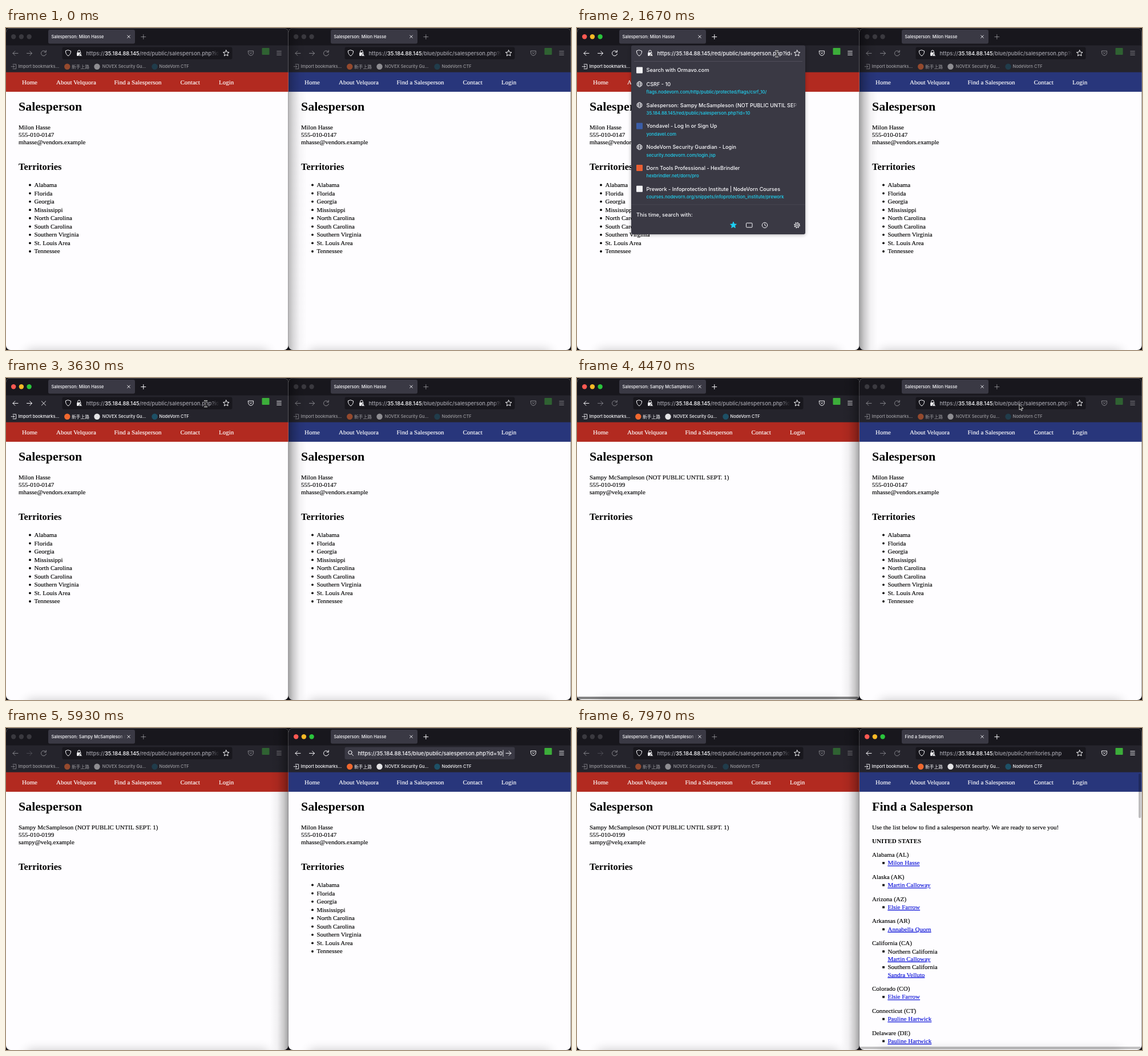
These frames come from a looping animation (990 by 565 pixels, 8 s). An HTML page:

```html
<!DOCTYPE html>
<html lang="en">
<head>
<meta charset="utf-8">
<title>Two browser windows</title>
<style>
html, body { margin: 0; width: 100%; height: 100%; overflow: hidden; background: #131217; }
body > svg { display: block; width: 100vw; height: 100vh; }
text { white-space: pre; font-family: Inter, "Noto Sans CJK SC", "Noto Sans CJK", sans-serif; font-weight: 500; }
text.page { font-family: "Liberation Serif", "Times New Roman", serif; font-weight: 400; stroke-width: .15; }
text.strong { font-weight: 700; }
</style>
</head>
<body>
<svg viewBox="0 0 990 565">
  <defs>
    <clipPath id="window"><rect width="494.6" height="565" rx="8"/></clipPath>
    <linearGradient id="fadeField"><stop stop-color="#18171d" stop-opacity="0"/><stop offset="1" stop-color="#18171d"/></linearGradient>
    <linearGradient id="fadePanel"><stop stop-color="#3a3944" stop-opacity="0"/><stop offset="1" stop-color="#3a3944"/></linearGradient>
    <linearGradient id="fadeRow"><stop stop-color="#25242c" stop-opacity="0"/><stop offset="1" stop-color="#25242c"/></linearGradient>
    <linearGradient id="shade">
      <stop stop-opacity=".36"/><stop offset=".25" stop-opacity=".2"/>
      <stop offset=".6" stop-opacity=".05"/><stop offset="1" stop-opacity="0"/>
    </linearGradient>
    <filter id="soft" x="-20%" y="-300%" width="140%" height="700%"><feGaussianBlur stdDeviation="9"/></filter>
    <filter id="drop" x="-10%" y="-10%" width="120%" height="120%"><feGaussianBlur stdDeviation="3"/></filter>
  </defs>
  <g id="scene"></g>
</svg>
<script>
const LOOP = 8000;
const WHITE = '#fbfbfe', GREY = '#a3a2ab', PANEL = '#3a3944', FIELD = '#18171d', TOOLBAR = '#25242c';
const SMALL = 7.45, LINK = 7.85, NORMAL = 9.15, ADDRESS = 9.35;

const measurer = document.createElement('canvas').getContext('2d');
const widthOf = s => {
  measurer.font = `500 ${ADDRESS}px Inter, sans-serif`;
  return measurer.measureText(s).width;
};

// Drawing helpers, all returning SVG markup
const rect = (x, y, w, h, fill, r = 0, extra = '') =>
  `<rect x="${x}" y="${y}" width="${w}" height="${h}" rx="${r}" fill="${fill}" ${extra}/>`;
const dot = (x, y, r, fill) => `<circle cx="${x}" cy="${y}" r="${r}" fill="${fill}"/>`;
const line = (d, color = WHITE, w = 1, fill = 'none') =>
  `<path d="${d}" fill="${fill}" stroke="${color}" stroke-width="${w}" stroke-linecap="round" stroke-linejoin="round"/>`;
const ui = (x, y, s, size = NORMAL, fill = WHITE, extra = '') =>
  `<text x="${x}" y="${y}" font-size="${size}" fill="${fill}" ${extra}>${s}</text>`;
const serif = (x, y, s, color = '#000', extra = '') =>
  `<text class="page" x="${x}" y="${y}" font-size="11" fill="${color}" stroke="${color}" ${extra}>${s}</text>`;
const heading = (x, y, s, size) =>
  `<text class="page strong" x="${x}" y="${y}" font-size="${size}">${s}</text>`;
const crop = (x, y, w, h, body) =>
  `<svg x="${x}" y="${y}" width="${w}" height="${h}" viewBox="${x} ${y} ${w} ${h}">${body}</svg>`;
const dim = (opacity, body) => `<g opacity="${opacity}">${body}</g>`;

const icon = {
  back: (x, y) => line(`M${x + 4.5} ${y}H${x - 4.5}M${x - .7} ${y - 3.8}L${x - 4.5} ${y}l3.8 3.8`),
  forward: (x, y) => line(`M${x - 4.5} ${y}H${x + 4.5}M${x + .7} ${y - 3.8}L${x + 4.5} ${y}l-3.8 3.8`),
  reload: (x, y) => line(`M${x + 3.6} ${y - 2.7}A4.5 4.5 0 1 0 ${x + 4.4} ${y + 1}M${x + 4.3} ${y - 5.2}v3.2h-3.2`),
  cross: (x, y, r) => line(`M${x - r} ${y - r}l${2 * r} ${2 * r}m0 ${-2 * r}l${-2 * r} ${2 * r}`, WHITE, .9),
  plus: (x, y) => line(`M${x - 4} ${y}h8m-4-4v8`),
  shield: (x, y) => line(`M${x} ${y - 5.2}l4.6 1.6c0 4.2-1.5 6.8-4.6 8.6c-3.1-1.8-4.6-4.4-4.6-8.6z`),
  lock: (x, y) => line(`M${x - 2.2} ${y - 1}v-1.8a2.2 2.2 0 0 1 4.4 0v1.8`) +
    rect(x - 3.8, y - 1, 7.4, 6, WHITE, 1) + line(`M${x + 2.6} ${y + .4}l3 4.8h-6z`, FIELD, .8, WHITE),
  lens: (x, y) => line(`M${x + 1.5} ${y + 1.5}l3 3M${x + 2.2} ${y - 1}a3.2 3.2 0 1 0-6.4 0a3.2 3.2 0 1 0 6.4 0`),
  star(x, y, fill, color) {
    const points = Array.from({ length: 10 }, (_, i) => {
      const r = i % 2 ? 2.6 : 5.6, a = i * Math.PI / 5;
      return `${x + r * Math.sin(a)} ${y - r * Math.cos(a)}`;
    });
    return line(`M${points.join('L')}z`, color, 1, fill);
  },
  globe: (x, y) => `<g fill="none" stroke="${WHITE}" stroke-width=".9"><circle cx="${x}" cy="${y}" r="4.6"/>` +
    `<ellipse cx="${x}" cy="${y}" rx="2.1" ry="4.6"/><path d="M${x - 4.4} ${y - 1.5}h8.8m0 3h-8.8"/></g>`,
  pocket: (x, y) => line(`M${x - 4.4} ${y - 4}h8.8v3.6a4.4 4.4 0 0 1-8.8 0zM${x - 2} ${y - 1.2}l2 2l2-2`),
  menu: (x, y) => line(`M${x - 3.8} ${y - 3.2}h7.6m0 3.2h-7.6m0 3.2h7.6`),
  importing: (x, y) => line(`M${x - 1.5} ${y - 4}h5.5v8h-5.5M${x - 4.5} ${y}h5.5m-2-2l2 2l-2 2`, WHITE, .9),
  clock: (x, y) => `<circle cx="${x}" cy="${y}" r="4.7" fill="none" stroke="${WHITE}"/>` + line(`M${x} ${y - 2.6}v2.8l2 1.2`),
  gear: (x, y) => `<g fill="none" stroke="${WHITE}"><circle cx="${x}" cy="${y}" r="3.5"/><circle cx="${x}" cy="${y}" r="1.3"/>` +
    `<circle cx="${x}" cy="${y}" r="4.7" stroke-width="1.3" stroke-dasharray="1.8 1.89"/></g>`,
};

const SELLER = {
  tab: 'Salesperson: Milon Hasse', file: 'salesperson.php?id=1',
  lines: ['Milon Hasse', '555-010-0147', 'mhasse@vendors.example'],
  areas: ['Alabama', 'Florida', 'Georgia', 'Mississippi', 'North Carolina', 'South Carolina',
    'Southern Virginia', 'St. Louis Area', 'Tennessee'],
};
const HIDDEN = 'Sampy McSampleson (NOT PUBLIC UNTIL SEPT. 1)';
const SECRET = {
  tab: 'Salesperson: ' + HIDDEN, file: 'salesperson.php?id=10',
  lines: [HIDDEN, '555-010-0199', 'sampy@velq.example'], areas: [],
};
const FINDER = {
  tab: 'Find a Salesperson', file: 'territories.php',
  states: [
    ['Alabama (AL)', ['Milon Hasse']], ['Alaska (AK)', ['Martin Calloway']],
    ['Arizona (AZ)', ['Elsie Farrow']], ['Arkansas (AR)', ['Annabella Quorn']],
    ['California (CA)', ['Martin Calloway', 'Sandra Velluto'], ['Northern California', 'Southern California']],
    ['Colorado (CO)', ['Elsie Farrow']], ['Connecticut (CT)', ['Pauline Hartwick']],
    ['Delaware (DE)', ['Pauline Hartwick']],
  ],
};
const SUGGESTIONS = [
  ['CSRF - 10', 'flags.nodevorn.com/http/public/protected/flags/csrf_10/'],
  ['Salesperson: ' + HIDDEN, '35.184.88.145/red/public/salesperson.php?id=10'],
  ['Yondavel - Log In or Sign Up', 'yondavel.com', '#3a5da8'],
  ['NodeVorn Security Guardian - Login', 'security.nodevorn.com/login.jsp'],
  ['Dorn Tools Professional - HexBrindler', 'hexbrindler.net/dorn/pro', '#ea5f33'],
  ['Prework - Infoprotection Institute | NodeVorn Courses',
    'courses.nodevorn.org/snippets/infoprotection_institute/prework', '#f3f3f5'],
];

// Each window: when it has focus, and the times its address bar changes phase
const WINDOWS = [
  { x: 0, path: 'red', color: '#b22a20', active: [1500, 4485], next: SECRET, barAlpha: .5,
    phases: { open: 1620, select: 1700, end: 2150, typed: 2500, entered: 3080, loading: 3200, loaded: 4000 } },
  { x: 495, path: 'blue', color: '#28367b', active: [4485, LOOP], next: FINDER, barAlpha: .25, switchTab: true,
    phases: { open: 4700, select: 4780, end: 5150, typed: 5350, entered: 5870, loading: 6050, loaded: 7400 } },
];
const RAISE_RIGHT = 4440;

const phaseAt = (win, t) =>
  Object.entries(win.phases).reduce((name, [key, at]) => t >= at ? key : name, 'idle');

function sellerPage(p) {
  return heading(22, 145.4, 'Salesperson', 22) +
    p.lines.map((s, i) => serif(22, 177.5 + i * 13.2, s)).join('') +
    heading(22, 248.6, 'Territories', 16.5) +
    p.areas.map((s, i) => dot(42, 275.5 + i * 14.56, 1.9, '#000') + serif(49.5, 279 + i * 14.56, s)).join('');
}

function finderPage(p) {
  let y = 226;
  let out = heading(22, 145.4, 'Find a Salesperson', 22) +
    serif(22, 177.5, 'Use the list below to find a salesperson nearby. We are ready to serve you!') +
    heading(22, 201.6, 'UNITED STATES', 11);
  for (const [state, people, areas] of p.states) {
    out += serif(22, y, state);
    people.forEach((person, i) => {
      y += 14.4;
      out += rect(40.2, y - 5.4, 3.7, 3.7, '#000');
      if (areas) {
        out += serif(49.5, y, areas[i]);
        y += 13.3;
      }
      out += serif(49.5, y, person, '#0a10d8', 'text-decoration="underline"');
    });
    y += 24.4;
  }
  return out;
}

function dropdown(win, phase, url) {
  const typed = phase === 'typed';
  const bottom = 362 + (typed ? 14.3 : 0) - (win.switchTab ? 12 : 0);
  let out = rect(95, 32, 305, bottom - 31, '#000', 3, 'opacity=".3" filter="url(#drop)"') +
    rect(95, 30.5, 305, bottom - 30.5, PANEL, 3) + rect(100, 58, 295, .8, '#55545f');
  if (typed) {
    out += rect(100, 63, 295, 21.5, TOOLBAR, 3) + icon.globe(109.5, 74) +
      crop(121, 64, 236, 20, ui(121.5, 77, url, ADDRESS, WHITE, 'class="strong"') + rect(349, 64, 8, 20, 'url(#fadeRow)')) +
      ui(363, 76.5, '—', SMALL, GREY) + ui(375, 76.5, 'Visit', SMALL) + ui(104, 97.7, 'Norvane Suggest', SMALL);
  } else {
    out += rect(104, 68.5, 11, 11, '#f3f3f5', 1) + ui(121.5, 77.2, 'Search with Ormavo.com');
  }
  let y = typed ? 115.6 : 101.8;
  SUGGESTIONS.forEach(([title, address, color], i) => {
    const switching = win.switchTab && i === 1;
    const right = switching ? 322 : 386;
    out += (color ? rect(104, y - 9, 11, 11, color, 1) : icon.globe(109.5, y - 3.3)) +
      crop(121, y - 12, right - 121, 17, ui(121.5, y, title) + rect(right - 8, y - 12, 8, 17, 'url(#fadePanel)'));
    if (switching) {
      out += rect(329, y - 12, 63, 17.5, '#25242c', 2.5) + ui(334, y - .5, 'Switch to Tab', LINK);
    } else {
      out += ui(121.5, y + 13.4, address, LINK, '#1fd4f4');
    }
    y += switching ? 24.8 : 36.8;
  });
  const iy = bottom - 16;
  out += rect(95, bottom - 52.5, 305, .8, '#4b4a55') + ui(104, bottom - 31.3, 'This time, search with:');
  if (phase !== 'open') {
    ['#f3f3f5', '#f3f3f5', '#2b7fd8', '#de5833', '#f3f3f5', '#ececee'].forEach((color, i) => {
      out += rect(104 + i * 27.4, iy - 5.5, 11, 11, color, 1);
    });
  }
  return out + icon.star(274, iy, '#1cd0f3', '#1cd0f3') +
    `<rect x="296.5" y="${iy - 3.8}" width="10.5" height="7.6" rx="1" fill="none" stroke="${WHITE}"/>` +
    icon.clock(329, iy) + icon.gear(385.5, iy);
}

function addressBar(win, phase, page) {
  const focused = ['open', 'select', 'end'].includes(phase);
  const editing = phase === 'typed' || phase === 'entered';
  const file = editing || phase === 'loading' ? 'salesperson.php?id=10' : page.file;
  const tail = `/${win.path}/public/${file}`;
  const url = 'https://35.184.88.145' + tail;
  let out = focused || phase === 'typed' ? dropdown(win, phase, url)
    : rect(98.5, 33.5, 298, 21.5, editing ? PANEL : FIELD, 3);
  if (editing) {
    return out + icon.lens(109, 44) + ui(121.5, 47.8, url, ADDRESS) +
      rect(122 + widthOf(url), 38.5, .8, 11.5, WHITE) + icon.forward(385.5, 44.3);
  }
  const x = phase === 'end' ? 372 - widthOf(url) : 140.5;
  const text = focused ? ui(x, 47.8, url, ADDRESS)
    : ui(x, 47.8, `https://<tspan fill="${WHITE}">35.184.88.145</tspan>${tail}`, ADDRESS, GREY);
  const selection = phase === 'select' ? rect(140.5, 37.5, 236, 13.5, '#365d8c') : '';
  out += crop(140, 34, focused ? 236.5 : 233, 21, selection + text + (focused ? '' : rect(358, 34, 15, 21, 'url(#fadeField)')));
  if (phase === 'end') out += rect(372.5, 38.5, .8, 11.5, WHITE);
  return out + icon.shield(109, 44) + icon.lock(128, 44) + icon.star(385.7, 44.4, 'none', WHITE);
}

function browser(win, t) {
  const phase = phaseAt(win, t);
  const loaded = phase === 'loaded';
  const page = loaded ? win.next : SELLER;
  const active = t >= win.active[0] && t < win.active[1];
  const tone = active ? 1 : .45;
  const sinceLoad = loaded ? t - win.phases.loaded : Infinity;
  const lights = active ? ['#fe5952', '#f9b926', '#2ac53c'] : Array(3).fill('#3a393f');

  let out = rect(0, 0, 495, 565, '#fefdff') + rect(0, 0, 495, 31, FIELD) + rect(0, 30.5, 495, 47.5, TOOLBAR) +
    rect(0, 0, 495, .8, '#5a5960') +
    lights.map((c, i) => dot(13.2 + i * 13.7, 15.3, 4.2, c)).join('') +
    rect(74, 3, 152, 24.5, PANEL, 3) +
    crop(79, 5, 131, 20, ui(79.5, 18.3, page.tab, SMALL) + rect(196, 5, 14, 20, 'url(#fadePanel)')) +
    icon.cross(215, 15.2, 2.3) + dim(tone, icon.plus(240.8, 15.5));

  const reload = phase === 'loading' ? icon.cross(66, 44.4, 3.6) : icon.reload(66, 44.4);
  out += dim(tone, icon.back(16.5, 44.4) + dim(loaded ? .4 : 1, icon.forward(41, 44.4)) +
    dim(sinceLoad < 650 ? .4 : 1, reload) + icon.pocket(429, 44.2) + rect(448.5, 35, 13, 12, '#3cae3a', 1) +
    icon.menu(478.5, 44) + icon.importing(13.7, 67.7));
  out += dim(active ? 1 : .55, ui(21.5, 70.4, 'Import bookmarks...', SMALL) +
    dot(107.3, 67.7, 5.2, '#f0682e') + ui(115, 70.5, '新手上路', 7.75) +
    dot(159.5, 67.7, 5.2, '#e4e4e6') + ui(168.8, 70.4, 'NOVEX Security Gu...', SMALL) +
    dot(260.5, 67.7, 5.2, '#1d5066') + ui(268.5, 70.4, 'NodeVorn CTF', SMALL));

  out += rect(0, 77.6, 495, 34.3, win.color) +
    [[28, 'Home'], [88, 'About Velquora'], [189.5, 'Find a Salesperson'], [305.5, 'Contact'], [373, 'Login']]
      .map(([x, s]) => serif(x, 98.6, s, '#fff')).join('') +
    (page.states ? finderPage(page) : sellerPage(page)) +
    rect(35, 565, 425, 16, '#000', 8, 'opacity=".22" filter="url(#soft)"');

  if (sinceLoad < 800) {
    const bars = rect(1, 559.3, 492, 4.2, '#000', 2) + (page.states ? rect(489, 80, 4.2, 78, '#000', 2) : '');
    out += dim(win.barAlpha * Math.min(1, (800 - sinceLoad) / 200), bars);
  }
  out += addressBar(win, phase, page);

  const covered = (win.x > 0) !== (t >= RAISE_RIGHT);
  if (covered) {
    const strength = t < 1500 ? .75 : 1;
    const flip = win.x ? '' : 'transform="translate(494.6 0) scale(-1 1)"';
    out += `<g ${flip}>` + rect(0, 0, 32, 565, 'url(#shade)', 0, `opacity="${strength}"`) + '</g>';
  }
  return `<g transform="translate(${win.x} 0)" clip-path="url(#window)">${out}</g>`;
}

const ease = (t, from, to) => {
  const p = Math.min(1, Math.max(0, (t - from) / (to - from)));
  return p * p * (3 - 2 * p);
};

function pointer(t) {
  if (t < 500 || (t >= 2500 && t < 3600) || t >= 5350) return '';
  const rise = ease(t, 500, 1350), across = ease(t, 3650, 4400);
  const x = 560 - 210 * rise + 425 * across, y = 575 - 530 * rise + 2 * across;
  const overText = (t >= 1500 && t < 3650) || t >= 4485;
  if (!overText) return line(`M${x} ${y}v9l2.1-2l1.5 3.4l1.5-.7l-1.5-3.2h3z`, '#fff', .8, '#000');
  const beam = `M${x - 2} ${y - 5}q2 0 2 1.5v7.5q0 1.5-2 1.5m4 0q-2 0-2-1.5v-7.5q0-1.5 2-1.5`;
  return line(beam, '#fff', 2) + line(beam, '#111', .9);
}

const scene = document.getElementById('scene');
let shown = '';
function draw() {
  const t = performance.now() % LOOP;
  const markup = WINDOWS.map(win => browser(win, t)).join('') + pointer(t);
  if (markup !== shown) scene.innerHTML = shown = markup;
  requestAnimationFrame(draw);
}
draw();
</script>
</body>
</html>
```
